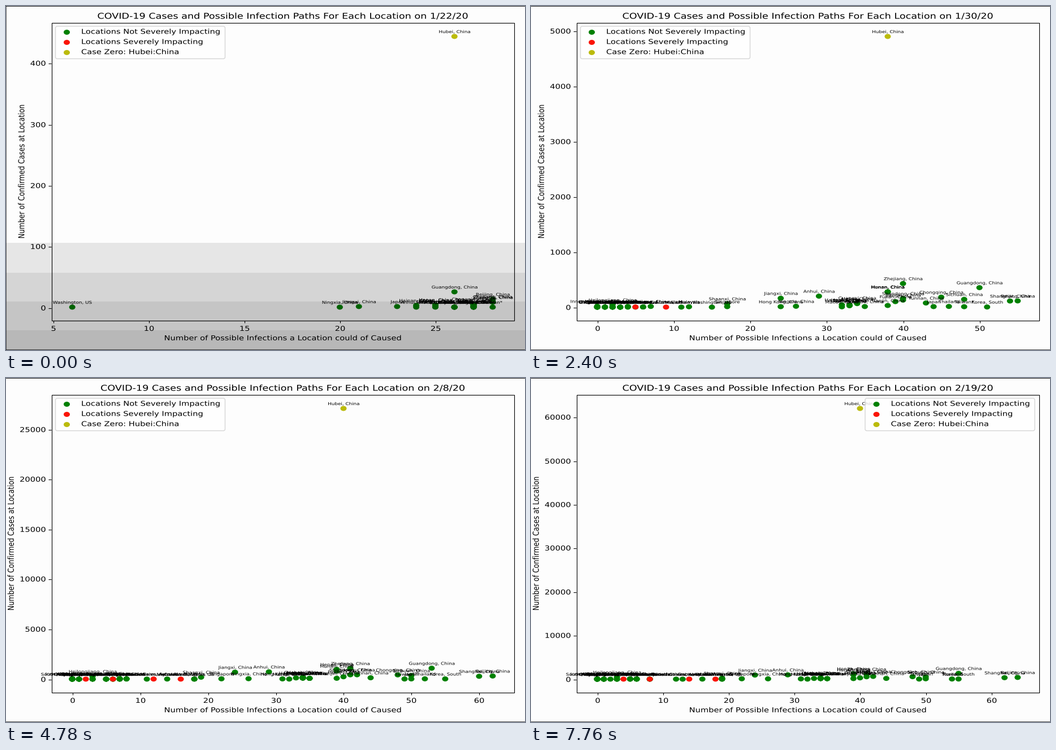
These frames come from a looping animation (918 px wide and 610 px high, 8 s). A matplotlib script:

```python
import numpy as np
import matplotlib
import matplotlib.pyplot as plt
from matplotlib.animation import FuncAnimation
from matplotlib.patches import FancyBboxPatch, PathPatch, Rectangle
from matplotlib.path import Path
from matplotlib.textpath import TextPath
from matplotlib.ticker import MaxNLocator
from matplotlib.transforms import Affine2D

matplotlib.rcParams["font.family"] = "DejaVu Sans"

W, H, DPI = 918, 610, 100
LOOP, STEP = 8000, 40
LEFT, RIGHT, TOP, BOTTOM = 80, 898, 30, 558

# The plot is a 10 x 8 inch chart shown with non-square pixels.
SX = (RIGHT - LEFT) / 775
SY = (BOTTOM - TOP) / 616
PT = DPI / 72

GREEN, RED, YELLOW = "#008000", "#fa1405", "#bbbb0c"
PAPER = "#fdfdfd"

# Time at which each day appears, in ms
DAY_START = [0, 500, 630, 820, 1390, 1640, 1900, 2150, 2400, 2720, 2900,
             3140, 3390, 3710, 4030, 4280, 4480, 4780, 5050, 5310, 5630,
             5790, 6100, 6350, 6670, 6860, 7110, 7370, 7690]
HUBEI = [444, 444, 549, 761, 1058, 1423, 3554, 3554, 4903, 5806, 7153,
         11177, 13522, 16678, 19665, 22112, 24953, 27100, 29631, 31728,
         33366, 33366, 48206, 54406, 56249, 58182, 59989, 61682, 62031]
X_DAYS = (0, 4, 8, 10, 13, 22, 28)
Y_DAYS = (0, 4, 8, 11, 17, 28)

places = []


def pad(keys):
    keys = list(keys)
    return keys + keys[-1:] * (6 - len(keys))


def place(name, xs, ys=(1,), start=0, color=GREEN):
    places.append((name, pad(xs), pad(ys), start, color))


def china(name, xs, ys, start=0):
    place(name + ", China", xs, ys, start)


china("Anhui", (24, 29), (1, 60, 200, 340, 733, 986))
china("Beijing", (28, 45, 55, 61, 62, 64), (14, 68, 114, 191, 315, 395))
china("Chongqing", (27, 39, 45, 48), (6, 75, 182, 300, 428, 560))
china("Fujian", (26, 36, 39, 40), (1, 35, 101, 159, 239, 293))
china("Gansu", (30, 33, 33, 35), (2, 7, 26, 45, 79, 91), 1)
china("Guangdong", (26, 41, 50, 52, 53, 55), (26, 111, 354, 632, 1095, 1331))
china("Guangxi", (25, 33, 34), (2, 36, 78, 111, 183, 245))
china("Guizhou", (26, 34, 35), (1, 7, 12, 38, 89, 146))
china("Hainan", (24, 31, 32, 33), (4, 22, 43, 64, 123, 163))
china("Hebei", (27, 33, 34), (1, 13, 65, 104, 195, 307))
china("Heilongjiang", (2, 2, 2, 3), (1, 15, 43, 95, 282, 476), 1)
china("Henan", (25, 36, 38, 39), (5, 83, 278, 493, 981, 1262))
china("Hong Kong", (14, 14, 24, 30, 31), (2, 8, 10, 15, 26, 63), 1)
china("Hunan", (25, 36, 38, 39), (4, 69, 277, 463, 803, 1008))
china("Inner Mongolia", (0,), (1, 7, 18, 27, 50, 75), 2)
china("Jiangsu", (27, 36, 40, 42), (1, 33, 129, 236, 439, 631))
china("Jiangxi", (21, 24), (2, 36, 162, 333, 698, 934))
china("Jilin", (1, 4, 4, 6, 7, 5), (1, 4, 14, 23, 69, 91), 1)
china("Liaoning", (25, 32, 33, 34), (2, 21, 39, 64, 105, 121))
china("Macau", (25, 30, 32), (1, 5, 7, 8, 10))
china("Ningxia", (20, 25, 26), (1, 4, 17, 28, 45, 71))
china("Qinghai", (0,), (1, 1, 8, 11, 18), 3)
china("Shaanxi", (14, 14, 17, 19), (1, 22, 63, 116, 195, 242), 1)
china("Shandong", (27, 37, 40, 41), (2, 46, 158, 230, 435, 544))
china("Shanghai", (28, 45, 54, 59, 60, 62), (9, 40, 112, 182, 286, 333))
china("Shanxi", (26, 34, 33, 34), (1, 9, 35, 66, 104, 131))
china("Sichuan", (27, 42, 48, 50), (5, 44, 142, 231, 363, 514))
china("Tianjin", (27, 34, 38, 39), (4, 14, 31, 48, 88, 130))
china("Tibet", (0,), (1,), 8)
china("Xinjiang", (2, 5, 7, 7, 8, 6), (1, 4, 14, 21, 42, 76), 1)
china("Yunnan", (26, 37, 43, 44), (1, 16, 76, 105, 138, 172))
china("Zhejiang", (28, 39, 40, 41), (10, 104, 428, 661, 1075, 1174))
place("Washington, US", (6, 12, 15, 17, 18, 19))
place("Japan", (23, 35, 44, 49, 50), (2, 4, 11, 20, 25, 84))
place("Thailand", (27, 38, 46, 51, 52, 54), (2, 8, 14, 19, 32, 35))
place("Taiwan*", (28, 41, 48, 49), (1, 4, 9, 10, 17, 23))
place("Korea, South", (27, 42, 51, 55), (1, 3, 4, 15, 24, 31))
place("Vietnam", (5, 7, 11, 14, 14, 16), (2, 2, 2, 6, 13, 16), 1)
place("Singapore", (7, 9, 17, 22), (1, 4, 10, 18, 33, 84), 1)
place("Malaysia", (3, 5, 12, 18, 18, 19), (3, 4, 8, 8, 16, 22), 3)
place("France", (2, 4, 6, 8, 8, 6), (2, 3, 5, 6, 11, 12), 2)
place("Nepal", (0, 1, 1, 3, 1), start=3)
place("Illinois, US", (1, 2, 3, 4, 5, 3), start=2)
place("Arizona, US", (0, 1, 2, 3, 3, 2), start=4)
place("New South Wales, Australia", (3, 3, 6, 11, 11, 12), (3, 3, 4), 4)
place("Victoria, Australia", (0, 0, 5, 8, 7, 8), (1, 1, 2, 4), 4)
place("Ontario, Canada", (0, 0, 4, 6, 6, 8), start=4)
place("Cambodia", (0,), start=5)
place("Sri Lanka", (1, 1, 1, 0), start=5)
place("British Columbia, Canada", (2, 2, 3, 5, 6, 13), start=6)
place("Queensland, Australia", (2, 2, 2, 3, 5), (1, 1, 3, 3, 5), 7)
place("Finland", (0,), start=7)
place("United Arab Emirates", (1, 1, 1, 4, 5), (4, 4, 4, 5, 7, 9), 7)
place("India", (2, 2, 2, 3), start=8)
place("Philippines", (3, 3, 3, 6, 7, 6), start=8)
place("South Australia, Australia", (0,), (2,), 10)
place("Russia", (0,), (2,), 9)
place("Spain", (0,), start=10)
place("Sweden", (0,), start=9)
place("Massachusetts, US", (0, 0, 0, 0, 1), start=10)
place("Belgium", (0,), start=13)
place("Wisconsin, US", (1,), start=14)
place("California, US", (2, 3, 9, 15, 16, 18), (1, 2, 2, 3, 6, 8), 2, RED)
place("Germany", (5, 5, 5, 11, 12, 14), (4, 4, 4, 10, 13, 16), 6, RED)
place("Italy", (5, 5, 5, 5, 6, 8), (2, 2, 2, 2, 3), 9, RED)
place("United Kingdom", (1, 1, 1, 1, 2, 4), (2, 2, 2, 2, 3, 9), 9, RED)
place("Hubei, China", (26, 35, 38, 40), color=YELLOW)


def x_value(keys, day):
    eff = day if day <= 22 else 25 if day < 28 else 28
    return np.floor(np.interp(eff, X_DAYS, keys[:5] + keys[4:]) + 0.5)


def y_value(name, keys, day):
    if name.startswith("Hubei"):
        return HUBEI[day]
    if day > 17:
        p = (day - 17) / 11
        day = 17 + 11 * (1 - (1 - p) ** 2)
    return round(np.interp(day, Y_DAYS, keys))


glyph_cache = {}


def glyphs(s, size):
    """Outline of a string with its left and right edge."""
    if (s, size) not in glyph_cache:
        path = TextPath((0, 0), s, size=size * PT)
        verts, codes = np.array(path.vertices), np.array(path.codes)
        xs = verts[:, 0]
        glyph_cache[s, size] = Path(verts, codes), xs.min(), xs.max()
    return glyph_cache[s, size]


def text(s, x, y, size=10, ha="center", angle=0):
    """Outline of a string with its baseline anchored at pixel (x, y)."""
    path, x0, x1 = glyphs(s, size)
    shift = {"left": 0, "center": (x0 + x1) / 2, "right": x1}[ha]
    tr = Affine2D().translate(-shift, 0).rotate_deg(angle)
    return path.transformed(tr.scale(SX, -SY).translate(x, y))


def dot(x, y):
    r = 7.5 * PT / 2
    return Path.unit_circle().transformed(
        Affine2D().scale(r * SX, r * SY).translate(x, y))


def join(paths):
    return Path.make_compound_path(*paths) if paths else Path(np.zeros((1, 2)))


fig = plt.figure(figsize=(W / DPI, H / DPI), dpi=DPI, facecolor=PAPER)
ax = fig.add_axes([0, 0, 1, 1])
ax.set(xlim=(0, W), ylim=(H, 0), autoscale_on=False)
ax.axis("off")


def add(patch):
    # add_artist skips the slow data-limit update of add_patch
    return ax.add_artist(patch)


def layer(color, z, path=None):
    return add(PathPatch(path or join([]), fc=color, ec="none", lw=0,
                         zorder=z))


def bar(x, y, w, h, color, z):
    return add(Rectangle((x, y), w, h, fc=color, ec="none", lw=0, zorder=z))


# Static parts
add(Rectangle((LEFT + 0.5, TOP - 0.5), RIGHT - LEFT, BOTTOM - TOP,
              fill=False, ec="black", lw=0.8, zorder=2.5))
bar(0, 0, W, 1, "#202020", 8)
bar(0, H - 1, W, 1, "#505050", 8)
layer("black", 3, text("Number of Possible Infections a Location could of Caused",
                       (LEFT + RIGHT) / 2, 592.7))

dots = {c: layer(c, 2 + 0.1 * i) for i, c in enumerate((GREEN, RED, YELLOW))}
labels = layer("black", 3)
chrome = layer("black", 3)
ticks = add(PathPatch(join([]), fill=False, ec="black", lw=0.8, zorder=2.5))

# Legend, moved as one group
LEGEND_X, LEGEND_W = 87.5, 300
legend_shift = Affine2D()
legend = [add(FancyBboxPatch(
    (LEGEND_X, 36), LEGEND_W, 57.5, boxstyle="round,pad=0,rounding_size=3",
    fc="white", ec="#cccccc", lw=1, alpha=0.8, zorder=5))]
for row, (color, words) in enumerate([
        (GREEN, "Locations Not Severely Impacting"),
        (RED, "Locations Severely Impacting"),
        (YELLOW, "Case Zero: Hubei:China")]):
    y = 46.5 + 18 * row
    legend.append(layer(color, 6, dot(107.5, y)))
    legend.append(layer("black", 6, text(words, 133, y + 2.8, ha="left")))
for part in legend:
    part.set_transform(legend_shift + ax.transData)

# Grey bands that cover the opening picture
edges = [420, 473, 524, 575, H]
shades = [(bar(0, a, W, b - a, "black", 9), alpha)
          for a, b, alpha in zip(edges, edges[1:], (0.09, 0.155, 0.22, 0.27))]
shades.append((bar(0, 0, 1, H, "black", 9), 0.6))

locator = MaxNLocator(9, steps=[1, 2, 2.5, 5, 10])


def axis_scale(values, start, end):
    """Value-to-pixel map and visible ticks for data with 5 % margins."""
    lo, hi = min(values), max(values)
    margin = 0.05 * (hi - lo)
    lo, hi = lo - margin, hi + margin

    def to_px(v):
        return start + (end - start) * (v - lo) / (hi - lo)

    return to_px, [v for v in locator.tick_values(lo, hi) if lo <= v <= hi]


def build_day(day):
    """Paths of everything that depends on the day, and the legend shift."""
    active = [(name, x_value(xs, day), y_value(name, ys, day), color)
              for name, xs, ys, start, color in places if start <= day]
    to_x, x_ticks = axis_scale([p[1] for p in active], LEFT, RIGHT)
    to_y, y_ticks = axis_scale([p[2] for p in active], BOTTOM, TOP)

    groups = {c: [] for c in dots}
    names = []
    for name, x, y, color in active:
        px, py = to_x(x), to_y(y)
        groups[color].append(dot(px, py))
        names.append(text(name, px, py - 5 * PT * SY, 6))

    month, date = (1, 22 + day) if day < 10 else (2, day - 9)
    words = [text("COVID-19 Cases and Possible Infection Paths For Each "
                  f"Location on {month}/{date}/20",
                  (LEFT + RIGHT) / 2, 22.6, 12)]
    marks = []
    for v in x_ticks:
        px = np.floor(to_x(v)) + 0.5
        words.append(text(f"{v:.0f}", px, 576))
        marks.append(Path([(px, BOTTOM), (px, BOTTOM + 3.5 * PT * SY)]))
    label_edge = LEFT - 7 * PT * SX
    for v in y_ticks:
        py = np.floor(to_y(v)) + 0.5
        words.append(text(f"{v:.0f}", label_edge, py + 4.3, ha="right"))
        marks.append(Path([(LEFT - 3.5 * PT * SX, py), (LEFT, py)]))
    digits = max(len(f"{v:.0f}") for v in y_ticks)
    base = label_edge - (0.636 * 10 * digits + 4 + 2.4) * PT * SX
    words.append(text("Number of Confirmed Cases at Location", base,
                      (TOP + BOTTOM) / 2, angle=90))

    # The legend takes the right corner once the top point clears it.
    right_x = RIGHT - 7 - LEGEND_W
    clear = to_x(active[-1][1]) < right_x
    paths = [(dots[c], join(g)) for c, g in groups.items()]
    paths += [(labels, join(names)), (chrome, join(words)),
              (ticks, join(marks))]
    return paths, right_x - LEGEND_X if clear else 0


days = {}


def show_day(day):
    if day not in days:
        days[day] = build_day(day)
    paths, shift = days[day]
    for patch, path in paths:
        patch.set_path(path)
    legend_shift.clear().translate(shift, 0)


def update(i):
    t = i * STEP + STEP / 2
    show_day(int(np.searchsorted(DAY_START, t, side="right")) - 1)
    step = 0 if t < 500 else min(6, int((t - 500) / 64) + 1)
    for patch, alpha in shades:
        patch.set_alpha(alpha * (1 - step / 6))
        patch.set_visible(step < 6)
    return []


anim = FuncAnimation(fig, update, frames=LOOP // STEP, interval=STEP,
                     repeat=True, blit=False)
plt.show()
```
